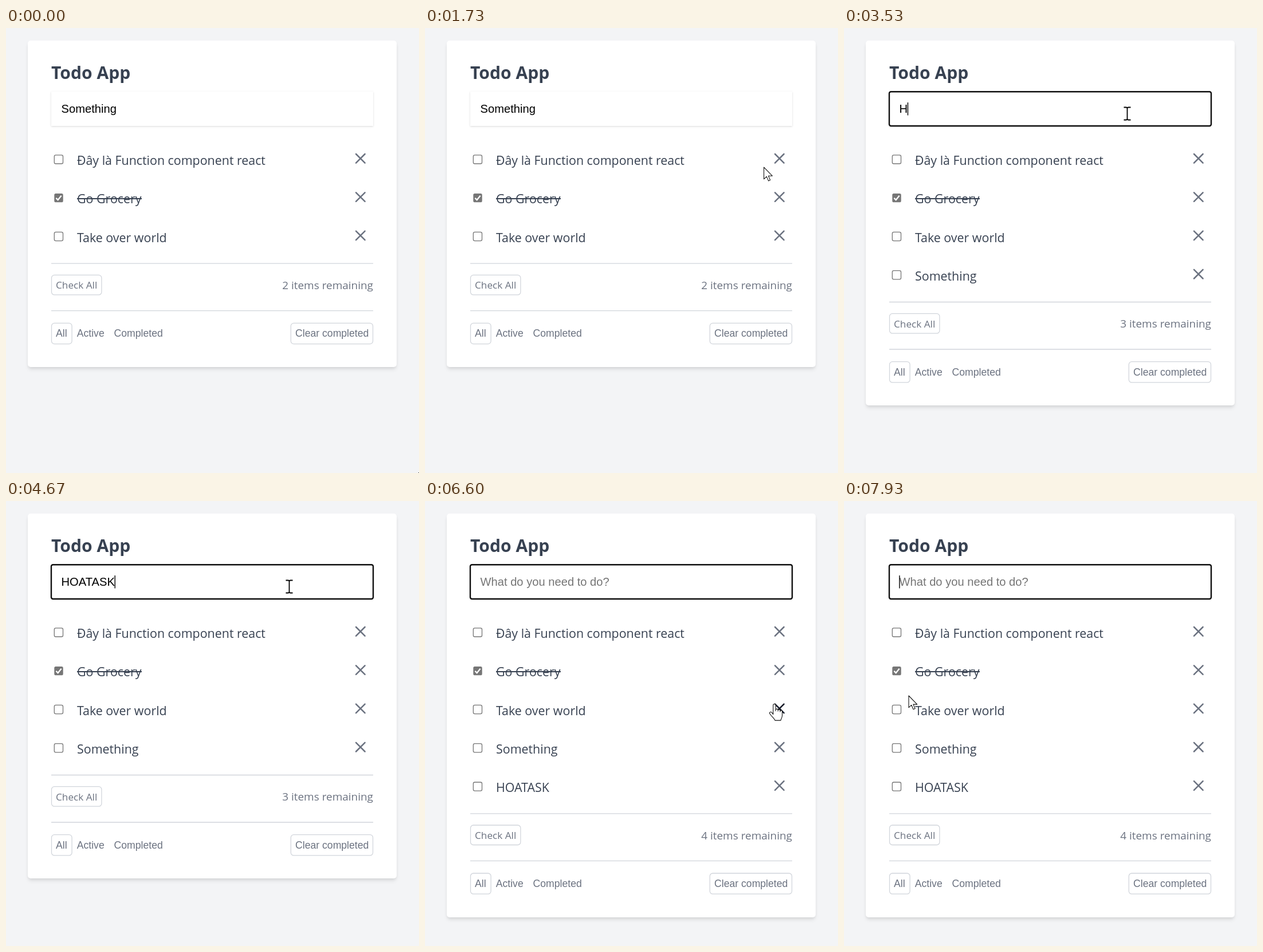
These frames come from a looping animation (721x777 px, 8000 ms). An HTML page:

```html
<!DOCTYPE html>
<html lang="en">
<head>
<meta charset="utf-8">
<title>Todo App</title>
<style>
  html, body { margin: 0; width: 100%; height: 100%; overflow: hidden; background: #f3f4f6; }
  div, svg { position: absolute; left: 0; top: 0; }
  #card { left: 38px; top: 21.5px; width: 644px; border-radius: 5px; background: #fff;
    box-shadow: 0 5px 7.6px -1.3px rgba(0,0,0,.1), 0 2.5px 5px -1.3px rgba(0,0,0,.06); }
  #field { left: 79px; top: 111px; width: 562px; height: 60px; background: #fff;
    box-shadow: 0 1.3px 3.8px rgba(0,0,0,.1), 0 1.3px 2.5px rgba(0,0,0,.06); }
  text { font-family: "Open Sans", "Noto Sans", sans-serif; fill: #6b7280; white-space: pre; }
  .arial { font-family: "Liberation Sans", Arial, sans-serif; font-size: 17.64px; }
  .title { font-size: 30.1px; font-weight: 700; fill: #374151; }
  .item { font-size: 21.4px; fill: #374151; }
  #typed { font-size: 20.16px; }
  .line { fill: none; stroke: #d1d5db; stroke-width: 1.26; }
  .box { fill: #fff; stroke: #767676; stroke-width: 1.3; }
  .cross { fill: none; stroke: #6b7280; stroke-width: 2.5; stroke-linecap: round; }
  .hover { stroke: #111827; }
  .shape { fill: #fff; stroke: #111; stroke-width: 1.1; stroke-linejoin: round; }
</style>
</head>
<body>
<div id="card"></div>
<div id="field"></div>
<svg width="721" height="777" viewBox="0 0 721 777">
  <text class="title" x="79" y="89">Todo App</text>
  <rect id="ring" x="79" y="111.2" width="562" height="59.8" rx="3" fill="none" stroke="#101010" stroke-width="2.4"/>
  <text id="typed" class="arial" x="96.5" y="148"></text>
  <rect id="caret" y="130" width="1.4" height="22.5"/>
  <g id="list"></g>
  <g id="footer">
    <path class="line" d="M79 411.2h562M79 493.7h562"/>
    <rect class="line" x="79.5" y="431.4" width="87.4" height="34.5" rx="5"/>
    <text x="87" y="455.4" font-size="17.2">Check All</text>
    <text id="left" x="641" y="456.2" font-size="18.95" text-anchor="end"></text>
    <rect class="line" x="79.5" y="515.4" width="35.6" height="36.2" rx="5"/>
    <rect class="line" x="497.3" y="515.4" width="143.2" height="36.2" rx="5"/>
    <g class="filters">
      <text class="arial" x="87" y="539.3">All</text>
      <text class="arial" x="123.7" y="539.3">Active</text>
      <text class="arial" x="188.6" y="539.3">Completed</text>
      <text class="arial" x="505" y="539.3">Clear completed</text>
    </g>
  </g>
  <g id="pointer">
    <path id="arrow" class="shape" d="M.5 .5V21.2L5.2 16.8 8.5 24.3 11.6 23 8.4 15.6H15.2Z"/>
    <path id="beam" fill="none" stroke="#000" stroke-width="1.8"
      d="M-6-11h3.8q2.2 0 2.2 2.2V8.8q0 2.2-2.2 2.2H-6M6-11H2.2Q0-11 0-8.8M6 11H2.2Q0 11 0 8.8"/>
    <path id="hand" class="shape" d="M-2.2 18V2.2a2.2 2.2 0 0 1 4.4 0V12v-1.4a2 2 0 0 1 4 0v1.9v-1a1.9 1.9 0 0 1 3.8 0v2v-.6a1.8 1.8 0 0 1 3.6 0V20c0 4-2 5-2.6 8.6H1C0 25-5 22-8 17c-1.5-2.5 1.5-4.3 3.3-2.4Z"/>
  </g>
</svg>
<script>
const $ = id => document.getElementById(id);
const LOOP = 8000, STEP = 200 / 3, PITCH = 67.3;
const FOCUS = 2330, FIRST_ADD = 2730, SECOND_ADD = 4870, BLINK = 1600 / 3;
const WORD = "HOATASK", TYPE_START = 3530, KEY_GAP = 190;
const ITEMS = ["Đây là Function component react", "Go Grocery", "Take over world", "Something", WORD];

// Pointer sweeps: each is a cubic curve that starts where the last one ended
const HOME = [720, 776];
const SWEEPS = [
  { from: 333, to: 2067, curve: [[351, 380], [781, 330], [494.5, 149.5]] },
  { from: 5533, to: 5800, curve: [[530, 190], [580, 280], [621.5, 351]] },
  { from: 5800, to: 6600, curve: [[640, 343], [612, 343], [610, 354.5]] },
  { from: 6600, to: 7933, curve: [[570, 480], [733, 833], [112.5, 339.5]] }
];

$("list").innerHTML = ITEMS.map((label, i) => `<g transform="translate(0 ${i * PITCH})">` +
  (i === 1
    ? `<rect x="84.3" y="221.6" width="15.4" height="15.4" rx="2.6" fill="#767676"/>
       <path d="M87.4 229.6l3.2 3.3 6-7.4" fill="none" stroke="#fff" stroke-width="2.3"/>
       <path d="M124 230.8h113" stroke="#374151" stroke-width="2"/>`
    : `<rect class="box" x="84.3" y="221.8" width="15.2" height="15.2" rx="2.6"/>`) +
  `<text class="item" x="124" y="239">${label}</text>
   <path class="cross" d="M611 220l15.6 15.6m0-15.6l-15.6 15.6"/></g>`).join("");

const rows = [...$("list").children];
const crosses = rows.map(row => row.querySelector(".cross"));
const show = (el, on) => el.setAttribute("visibility", on ? "visible" : "hidden");
const clamp = (v, low, high) => Math.max(low, Math.min(high, v));

function pointerAt(t) {
  let start = HOME;
  for (const { from, to, curve: [a, b, end] } of SWEEPS) {
    if (t < to) {
      const u = clamp((t - from) / (to - from), 0, 1), v = 1 - u;
      return start.map((s, k) => v ** 3 * s + 3 * v * v * u * a[k] + 3 * v * u * u * b[k] + u ** 3 * end[k]);
    }
    start = end;
  }
  return start;
}

function draw(time) {
  const tick = Math.floor((time % LOOP + 5) / STEP) * STEP, t = tick + 5;
  const added = (t >= FIRST_ADD) + (t >= SECOND_ADD);
  const keys = clamp(Math.floor((t - TYPE_START) / KEY_GAP) + 1, 0, WORD.length);
  const focused = t >= FOCUS;

  const value = ["Something", WORD.slice(0, keys), ""][added];
  $("typed").textContent = value || "What do you need to do?";
  $("typed").style.fill = value ? "#000" : "#757575";
  show($("ring"), focused);
  const lastInput = keys ? TYPE_START + (keys - 1) * KEY_GAP : FOCUS;
  show($("caret"), focused && Math.floor((t - lastInput) / BLINK) % 2 === 0);
  $("caret").setAttribute("x", 96.2 + (value ? $("typed").getComputedTextLength() : 0));

  rows.forEach((row, i) => show(row, i < 3 + added));
  $("footer").setAttribute("transform", `translate(0 ${added * PITCH})`);
  $("left").textContent = `${2 + added} items remaining`;
  $("card").style.height = 570.5 + added * PITCH + "px";

  const [x, y] = pointerAt(tick);
  const over = crosses.findIndex((_, i) => Math.abs(x - 618.8) < 12 && Math.abs(y - 228 - i * PITCH) < 18);
  crosses.forEach((cross, i) => cross.classList.toggle("hover", i === over));
  const inField = x > 79 && x < 641 && y > 111 && y < 171;
  show($("hand"), over >= 0);
  show($("beam"), inField);
  show($("arrow"), over < 0 && !inField);
  $("pointer").setAttribute("transform", `translate(${x} ${y})`);
}

const start = performance.now();
(function loop() {
  draw(performance.now() - start);
  requestAnimationFrame(loop);
})();
</script>
</body>
</html>
```
